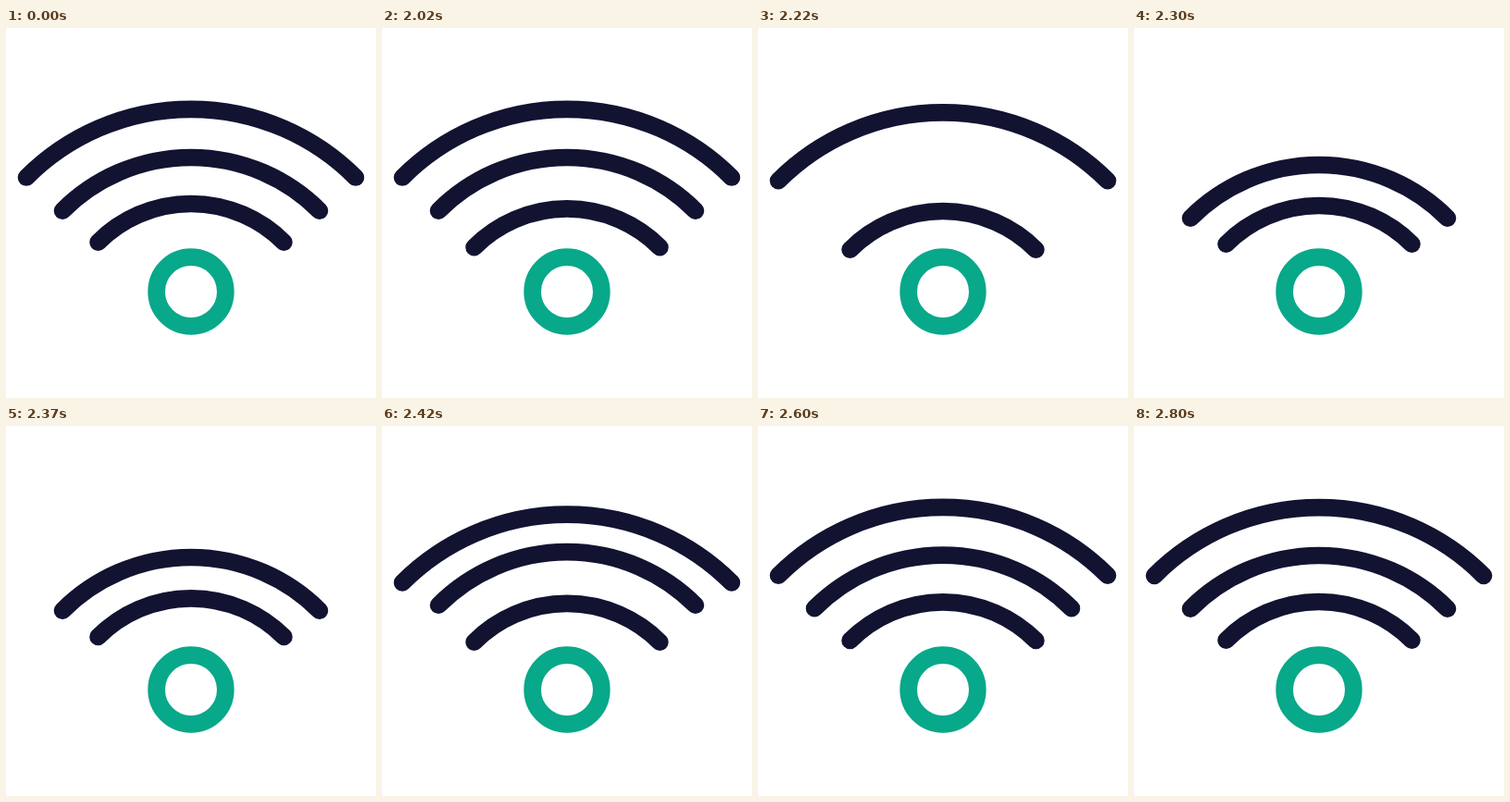
An HTML page with a canvas for the animation above (2.82 s loop, 400 by 400 pixels).

```html
<!DOCTYPE html>
<html lang="en">
<head>
<meta charset="utf-8">
<title>Wireless signal</title>
<style>
html, body { margin: 0; width: 100%; height: 100%; overflow: hidden; background: #fff; }
canvas { display: block; width: 400px; height: 400px; }
</style>
</head>
<body>
<canvas id="stage" width="400" height="400"></canvas>
<script>
const LOOP = 2820, ACTIVE = 2020;
const NAVY = '#121331', GREEN = '#08a88a';
const ctx = document.getElementById('stage').getContext('2d');

// drop: starts sinking, hide/show: invisible between, rise..peak: springs back up
const arcs = [
  { r: 142, top: 190, drop: 1996, hide: 2065, show: 2195, rise: 2240, peak: 2360 },
  { r: 196.5, top: 140, drop: 2095, hide: 2165, show: 2290, rise: 2310, peak: 2430 },
  { r: 251.7, top: 87.8, drop: 2206, hide: 2265, show: 2395, rise: 2408, peak: 2558 }
];
const DEPTH = 8, SINK = 55, SWING = 70;
const bounces = [-4, 2.25, -1, 0.5, 0];

const clamp = x => Math.min(1, Math.max(0, x));
const easeOut = x => 1 - (1 - x) ** 2;
const wave = x => (1 - Math.cos(Math.PI * x)) / 2;
const mix = (a, b, k) => a + (b - a) * k;

// Motion advances in alternating 30 and 20 ms ticks
function tick(t) {
  if (t < ACTIVE) return 0;
  const d = t - ACTIVE, r = d % 50;
  return ACTIVE + d - r + (r >= 30 ? 30 : 0);
}

function offset(a, t) {
  if (t < a.hide) return DEPTH * easeOut(clamp((t - a.drop) / SINK));
  if (t < a.peak) {
    return mix(DEPTH, bounces[0], wave(clamp((t - a.rise) / (a.peak - a.rise))));
  }
  const p = (t - a.peak) / SWING, i = Math.floor(p);
  if (i >= bounces.length - 1) return 0;
  return mix(bounces[i], bounces[i + 1], wave(p - i));
}

function strokeArc(y, r, from, to, color) {
  ctx.strokeStyle = color;
  ctx.beginPath();
  ctx.arc(200, y, r, from, to);
  ctx.stroke();
}

function draw(t) {
  ctx.fillStyle = '#fff';
  ctx.fillRect(0, 0, 400, 400);
  ctx.lineWidth = 18.7;
  ctx.lineCap = 'round';
  strokeArc(285, 37.35, 0, Math.PI * 2, GREEN);
  for (const a of arcs) {
    if (t >= a.hide && t < a.show) continue;
    strokeArc(a.top + a.r + offset(a, t), a.r, -Math.PI * 0.75, -Math.PI * 0.25, NAVY);
  }
}

const start = performance.now();
function frame() {
  draw(tick((performance.now() - start) % LOOP));
  requestAnimationFrame(frame);
}
frame();
</script>
</body>
</html>
```
